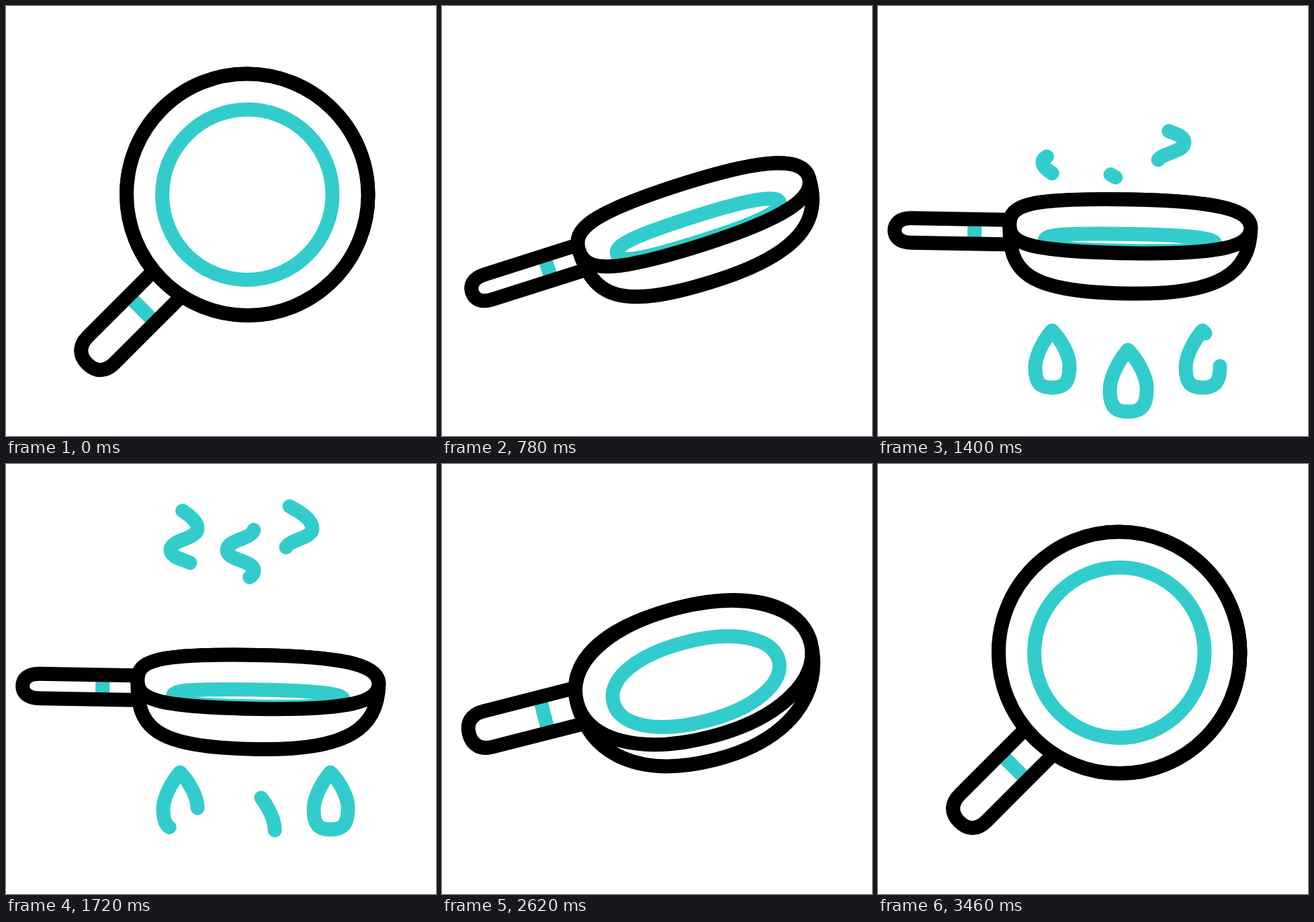
An HTML page that plays this animation: 640x640 px, repeating every 3.6 s.

```html
<!DOCTYPE html>
<html lang="en">
<head>
<meta charset="utf-8">
<title>Frying pan</title>
<style>
  html, body { margin: 0; width: 100%; height: 100%; overflow: hidden; background: #fff; }
  svg { display: block; width: 100vw; height: 100vh; }
  path { fill: none; stroke: #000; stroke-width: 21; stroke-linejoin: round; }
  .teal { stroke: #33cccc; }
  .white { fill: #fff; }
  .bare { fill: #fff; stroke: none; }
  .trim { stroke: #33cccc; stroke-linecap: round; }
</style>
</head>
<body>
<svg viewBox="0 0 640 640">
  <g id="flames"></g>
  <g id="steam"></g>
  <g id="pan">
    <path id="band" class="teal"/>
    <path id="handle"/>
    <path id="body" class="white"/>
    <path id="base" class="bare"/>
    <path id="ring" class="teal"/>
    <path id="rim"/>
  </g>
</svg>
<script>
const LOOP = 3600;
const $ = id => document.getElementById(id);
const lerp = (a, b, k) => a + (b - a) * k;
const clamp = x => Math.min(1, Math.max(0, x));
const ease = (t, start, dur) => {
  const x = clamp((t - start) / dur);
  return x * x * (3 - 2 * x);
};

// Closed oval with separate upper and lower heights.
// Square 0 is an ellipse, 1 a boxy shape that is fuller on the left.
function oval(cx, cy, rx, up, down, square) {
  const side = (dir, q) => ({
    x: cx + dir * rx,
    in: cx + dir * rx * (0.552 + 0.28 * q),
    ky: 0.552 + 0.13 * q
  });
  const l = side(-1, square * 1.15), r = side(1, square * 0.75);
  const half = (a, b, h) =>
    `C${a.x} ${cy + h * a.ky} ${a.in} ${cy + h} ${cx} ${cy + h}` +
    `C${b.in} ${cy + h} ${b.x} ${cy + h * b.ky} ${b.x} ${cy}`;
  return `M${l.x} ${cy}${half(l, r, -up)}${half(r, l, down)}Z`;
}

function handlePath(k) {
  const top = lerp(-18.5, 0.5, k), bottom = lerp(37.5, 37, k), mid = (top + bottom) / 2;
  const s = lerp(-262, -270, k), e = lerp(-291, -295, k), c = lerp(s, e, lerp(0.64, 0.75, k));
  const pull = y => lerp(y, mid, lerp(0.36, 0.5, k));
  $('band').setAttribute('d', `M-176 ${top}V${bottom}`);
  return `M-115 ${top}H${s}C${c} ${top} ${e} ${pull(top)} ${e} ${mid}` +
         `C${e} ${pull(bottom)} ${c} ${bottom} ${s} ${bottom}H-115`;
}

function drawPan(t) {
  const flat = ease(t, 0, 910) - ease(t, 2080, 1210);
  const turn = ease(t, 0, 1385) - ease(t, 2080, 1400);
  const lift = 7 * (ease(t, 1400, 640) - ease(t, 2060, 560));
  const cy = 7 * flat, square = flat ** 3;
  const up = lerp(180, 40, flat), deep = lerp(180, 100, flat);
  const ry = lerp(126.5, 12.5, flat);
  const rim = oval(55.5, cy, 179.5, up, up, square);

  $('pan').setAttribute('transform',
    `translate(320 ${320 - lift}) rotate(${-lerp(45, -1, turn)})`);
  $('handle').setAttribute('d', handlePath(clamp((flat - 0.55) / 0.45)));
  $('body').setAttribute('d', oval(55.5, cy, 179.5, up, deep, flat ** 2));
  $('base').setAttribute('d', rim);
  $('rim').setAttribute('d', rim);
  $('ring').setAttribute('d', oval(55.5, 31 * flat, 127, ry, ry, square));
}

const DROP = 'M26 53C26 78 18 85 0 85S-25 78-25 55C-25 37-12 14 0 0C12 12 26 35 26 53';
const WAVE = 'M22 257C8 249-6 242-6 233C-6 218 34 219 34 203C34 187-6 188-6 172' +
             'C-6 156 34 156 34 140C34 127 15 115 0 107';

function addPath(parent, d) {
  const p = document.createElementNS('http://www.w3.org/2000/svg', 'path');
  p.setAttribute('class', 'trim');
  p.setAttribute('d', d);
  p.setAttribute('pathLength', 100);
  return $(parent).appendChild(p);
}

function trim(p, from, to) {
  p.style.display = to - from > 0.004 ? '' : 'none';
  p.style.strokeDasharray = `${(to - from) * 100} 300`;
  p.style.strokeDashoffset = -from * 100;
}

const flames = [[259, 483, 1, 1080], [372, 512, 1.08, 975], [483, 483, 1, 1186]]
  .map(([x, y, size, start]) => ({ x, y, size, start, el: addPath('flames', DROP) }));
const steam = [[251, 1240], [335, 1325], [422, 1125]]
  .map(([x, start]) => ({ x, start, el: addPath('steam', WAVE) }));

function drawFlames(t) {
  for (const f of flames) {
    const y = f.y - (t - 1400) * 0.075;
    f.el.setAttribute('transform', `translate(${f.x} ${y}) scale(${f.size})`);
    f.el.style.strokeWidth = 21 / f.size;
    trim(f.el, ease(t, f.start + 525, 320), ease(t, f.start, 320));
  }
}

function drawSteam(t) {
  const y = -45 * ease(t, 1400, 290) + 45 * ease(t, 1690, 350) + 7 * ease(t, 2040, 140);
  for (const s of steam) {
    s.el.setAttribute('transform', `translate(${s.x} ${y})`);
    trim(s.el, ease(t, s.start, 1050), ease(t, s.start, 560));
  }
}

function frame() {
  const t = performance.now() % LOOP;
  drawPan(t);
  drawFlames(t);
  drawSteam(t);
  requestAnimationFrame(frame);
}
frame();
</script>
</body>
</html>
```
